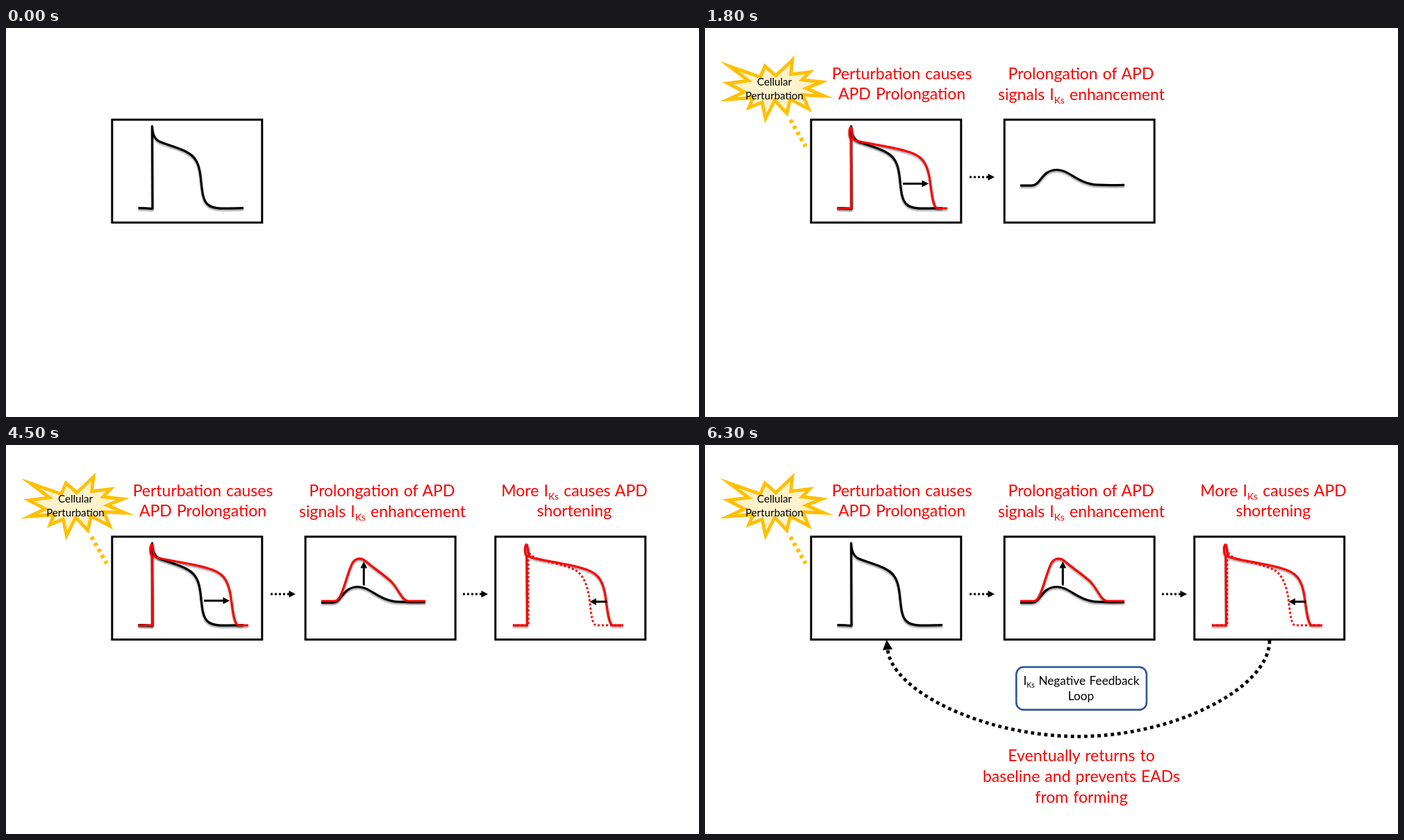
Animation, 998 px wide and 561 px high, one loop 7.2 s. Source, as an HTML page:

```html
<!DOCTYPE html>
<html lang="en">
<head>
<meta charset="utf-8">
<title>Negative feedback loop</title>
<style>
html, body { margin: 0; width: 100%; height: 100%; overflow: hidden; background: #fff; }
svg { display: block; width: 100vw; height: 100vh; }
text { font-family: Lato, "Open Sans", sans-serif; text-anchor: middle; word-spacing: 1.2px; }
.title { font-size: 23px; fill: #f00; }
.title .sub { font-size: 14px; }
.small { font-size: 15.1px; }
.note { font-size: 17.2px; }
.note .sub { font-size: 10.5px; }
.line { fill: none; stroke: #000; stroke-width: 3; }
.red { stroke: #f00; }
.curve { stroke-width: 3.2; stroke-linejoin: round; filter: drop-shadow(0 2px 1.3px rgba(0, 0, 0, .42)); }
.dots { stroke-dasharray: 3 3; }
</style>
</head>
<body>
<svg viewBox="0 0 998 561" preserveAspectRatio="none">
  <defs>
    <path id="long" d="M190.3 260 H211 L210.3 160 C207 156 207.5 143.5 210 143.5 C212.5 143.5 211 156 214.5 161 C220 165 262 169.5 288 177 C312 183 319 193 323 214 C326 231 327.5 260 335 260 H349"/>
  </defs>

  <rect class="line" x="152.8" y="132.2" width="216" height="148.4"/>
  <path class="line curve" d="M190.5 259.6 C197 259.6 205 260 211 260.6 L210.5 141.5 C211 152 213 159.5 221 163.8 C233 169 252 173 263 180.5 C274 187 278 197 280 213 C282.3 232 282.5 247 290 254 C297 261 309 260.6 342 259.6"/>

  <g data-from="1" data-to="7">
    <use href="#long" class="line red curve"/>
    <g data-arrow="285 224.5 322 224.5"></g>
  </g>

  <g data-from="1">
    <path id="star" fill="#fff2cc" stroke="#ffc000" stroke-width="4.8" stroke-miterlimit="8"/>
    <path d="M123 132.5 L145 171" fill="none" stroke="#ffc000" stroke-width="6" stroke-dasharray="5 5"/>
    <text class="small" x="100" y="83">Cellular</text>
    <text class="small" x="100" y="103">Perturbation</text>
    <text class="title" x="283.5" y="73.5">Perturbation causes</text>
    <text class="title" x="283.5" y="103.3">APD Prolongation</text>
  </g>

  <g data-from="2">
    <rect class="line" x="431.2" y="132.2" width="216" height="148.4"/>
    <path class="line curve" d="M454 227.2 H470 C484 227.5 484 204.5 507 204.5 C525 204.5 537 225 566 226.2 Q580 226.8 604 226.3"/>
    <g data-arrow="381 215 417 215" data-dots="1"></g>
    <text class="title" x="541.5" y="74.3">Prolongation of APD</text>
    <text class="title" x="542" y="104">signals I<tspan class="sub" dy="5">Ks</tspan><tspan dy="-5"> enhancement</tspan></text>
  </g>

  <g data-from="3">
    <path class="line red curve" d="M454 225 H474 C485 224 492 179 500 168.5 C505 162.5 512 162.5 518 167.5 C530 178 542 185 555 197 C566 209 571 225 579 225 H604"/>
    <g data-arrow="515.3 202.5 515.3 168"></g>
  </g>

  <g data-from="4">
    <rect class="line" x="704.8" y="132.2" width="216" height="148.4"/>
    <use href="#long" x="539.6" class="line red curve"/>
    <g data-arrow="658 215 694 215" data-dots="1"></g>
    <text class="title" x="818.5" y="73.8">More I<tspan class="sub" dy="5">Ks</tspan><tspan dy="-5"> causes APD</tspan></text>
    <text class="title" x="818.3" y="103.3">shortening</text>
  </g>

  <g data-from="5">
    <path class="line red dots" d="M730 260 H752 V150 C752 157 757 161 766 164 C784 169.5 806 173 820 180.5 C832 187 837 204 839.5 217 C842 234 843 260 850 260 H889"/>
    <g data-arrow="866 226 840.5 226"></g>
  </g>

  <g data-from="6">
    <path class="line" d="M813 282 C813 351 675 420.3 538 420.3 C400 420.3 266 353 263 293" stroke-dasharray="4.8 4.8" style="stroke-width:4.8"/>
    <path d="M261.5 281 L270 294.5 L256 296 Z"/>
    <text class="title" x="542" y="456">Eventually returns to</text>
    <text class="title" x="542" y="486">baseline and prevents EADs</text>
    <text class="title" x="542" y="516">from forming</text>
  </g>

  <g data-from="7">
    <rect x="448.3" y="320.3" width="187.6" height="61.6" rx="10.5" fill="#fff" stroke="#2f5597" stroke-width="2.6"/>
    <text class="note" x="542" y="345.7">I<tspan class="sub" dy="4">Ks</tspan><tspan dy="-4"> Negative Feedback</tspan></text>
    <text class="note" x="541.5" y="368.3">Loop</text>
  </g>
</svg>
<script>
const STEP = 900, STEPS = 8;
const NS = "http://www.w3.org/2000/svg";
const all = (q) => [...document.querySelectorAll(q)];

function add(parent, attrs) {
  const el = document.createElementNS(NS, "path");
  for (const k in attrs) el.setAttribute(k, attrs[k]);
  parent.append(el);
}

// Straight arrow with a solid head at its second end
function drawArrow(g) {
  const [x1, y1, x2, y2] = g.dataset.arrow.split(" ").map(Number);
  const len = Math.hypot(x2 - x1, y2 - y1);
  const turn = Math.atan2(y2 - y1, x2 - x1) * 180 / Math.PI;
  g.setAttribute("transform", `translate(${x1} ${y1}) rotate(${turn})`);
  const dots = g.dataset.dots ? " dots" : "";
  add(g, { class: "line" + dots, d: `M0 0H${len - 8}` });
  add(g, { d: `M${len} 0l-9.5 -4.9v9.8z` });
}
all("[data-arrow]").forEach(drawArrow);

// Corner points of the burst on a 216 x 216 grid
const burst = [
  [108, 58], [145.2, 0], [141.6, 53.3], [183.8, 44.6], [167, 73.2], [211, 81.4],
  [176, 104.8], [216, 132.9], [168.4, 129.4], [181.5, 181], [140.2, 144.6], [132.5, 197.4],
  [105.3, 149.4], [84.9, 216], [77.2, 156.3], [47.6, 176.2], [56.7, 139.4], [1.4, 145.9],
  [37.2, 117.8], [0, 86.2], [46.3, 76.2], [3.7, 23], [73.1, 63.2], [83.5, 23]
];
document.getElementById("star").setAttribute("d",
  "M" + burst.map(([x, y]) => [32.6 + x * 0.643, 46 + y * 0.391]).join("L") + "Z");

const parts = all("[data-from]").map((el) => ({
  el, from: +el.dataset.from, to: +(el.dataset.to || STEPS)
}));

function draw(ms) {
  const step = Math.floor(ms / STEP) % STEPS;
  for (const { el, from, to } of parts) {
    el.style.display = step >= from && step < to ? "" : "none";
  }
}

let start = null;
function tick(now) {
  if (start === null) start = now;
  draw(now - start);
  requestAnimationFrame(tick);
}
draw(0);
requestAnimationFrame(tick);
</script>
</body>
</html>
```
